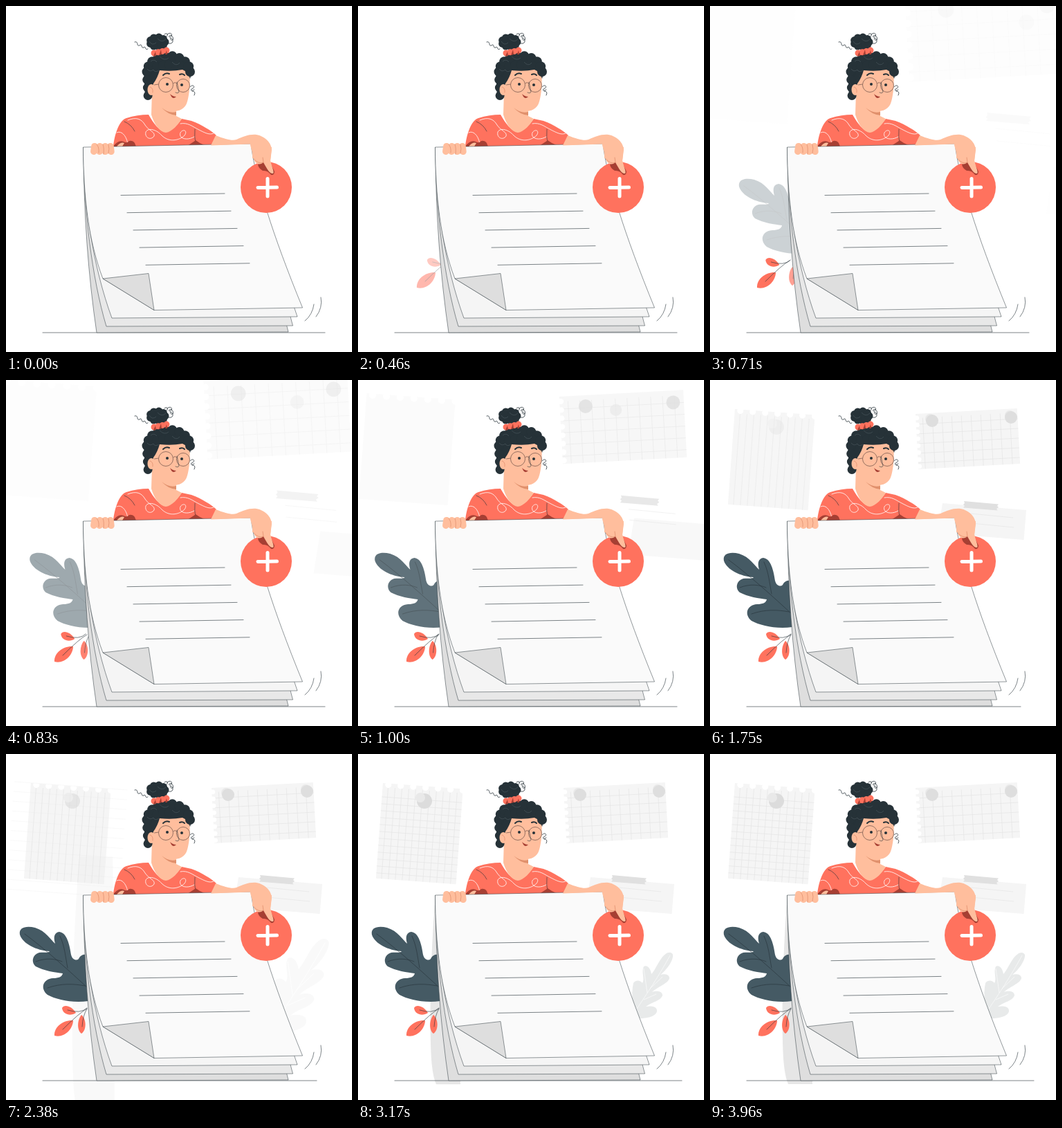
Recreate the animation shown at these times as an HTML page. Size 500 px wide and 500 px high, loop 4 s.

```html
<!DOCTYPE html>
<html lang="en">
<head>
<meta charset="utf-8">
<title>Add a note</title>
<style>
html, body { margin: 0; width: 100%; height: 100%; overflow: hidden; background: #fff; }
svg { display: block; width: 100vw; height: 100vh; }
.ink { fill: none; stroke: #263238; stroke-width: .6; stroke-linecap: round; stroke-linejoin: round; }
.edge { stroke: #263238; stroke-width: .5; stroke-linejoin: round; }
.grid { fill: none; stroke: #e2e2e2; stroke-width: .6; }
.paper { fill: #f5f5f5; }
.skin { fill: #ffbe9d; }
.coral { fill: #ff725e; }
.hair { fill: #263238; }
.shade { fill: #a63f33; }
.wave { fill: none; stroke: #fff; stroke-width: .8; stroke-linecap: round; }
.crease { fill: none; stroke: #dd8a69; stroke-width: .7; stroke-linecap: round; }
.rim { fill: none; stroke: #7b5d52; stroke-width: .8; }
.brow { fill: none; stroke: #263238; stroke-width: 2; stroke-linecap: round; }
</style>
</head>
<body>
<svg viewBox="0 0 500 500" xmlns="http://www.w3.org/2000/svg">
  <g id="gridNote">
    <g transform="translate(297 49) rotate(-3.1)">
      <path class="paper" d="M0 0H147V80H0Z"/>
      <path class="grid" id="gridLines"/>
      <g id="sideHoles" fill="#fff"></g>
    </g>
  </g>
  <g id="pinHeads" fill="#e9e9e9"></g>
  <g id="pinBases" fill="#dedede"></g>

  <g id="tallNote">
    <g transform="translate(36 42) rotate(4.2)">
      <path class="paper" d="M0 0H116V138H0Z"/>
      <path class="grid" id="tallCols"/>
      <g id="topHoles" fill="#fff"></g>
    </g>
  </g>
  <g id="tallRows"><path class="grid" id="rowLines" transform="translate(36 42) rotate(4.2)"/></g>
  <g id="tallPin">
    <circle cx="96" cy="68" r="11" fill="#dcdcdc"/><circle cx="90" cy="63" r="7" fill="#e9e9e9"/>
  </g>

  <path id="smallNote" class="paper" d="M336 178L457 188L453.500 231L329 221Z"/>
  <g id="tape">
    <path class="grid" d="M377 193L438 199M378 207L439 213"/>
    <path fill="#e0e0e0" d="M367 175L417 179.500L415 182L417 184L414 186L415.500 188.500L366 184.500L368 182L366 180L368 178Z"/>
  </g>

  <g id="plant">
    <path fill="#e8eaea" d="M400 381C412 384 432 380 432 371C432 364 422 364 416 365C425 358 437 357 440 349C440 342 430 342 425 344C433 336 448 332 450 324C450 317 440 318 437 319C446 312 456 298 455 290C452 284 444 287 438 296C433 303 428 314 424 318C423 310 418 304 413 307C409 315 415 325 411 331C408 327 402 326 398 331C396 340 396 350 397 360Z"/>
    <path fill="none" stroke="#fff" stroke-width=".6" d="M451 291C438 315 422 340 403 368M413 310L418 345M440 322L422 339M431 347L413 355"/>
  </g>
  <path id="shadow" fill="#e6e6e6" d="M112 205C107 260 102 370 106 440Q108 466 113 477L148 477L146 205Z"/>

  <g id="leaf">
    <path fill="#455a64" d="M119 357C95 360 73 355 60 348C49 339 53 325 68 324C76 324 81 322 82 317C72 316 54 313 43 307C36 301 38 290 48 287C55 286 61 288 63 285C44 284 24 274 20 261C18 250 30 248 42 251C58 256 64 268 71 274C68 264 70 258 77 257C88 258 92 276 94 290C96 298 102 299 105 296C108 290 112 289 119 290Z"/>
    <path class="ink" d="M27 260C58 283 92 314 118 338M78 263C85 278 86 294 89 309M43 300C58 294 72 296 81 300M60 338C80 331 98 332 114 335"/>
  </g>
  <g id="berryC"><path class="coral" d="M109 377C116 382 117 399 109 404C102 399 103 384 109 377Z"/><path class="ink" d="M117 368Q111 378 110 394"/></g>
  <g id="berryB"><path class="coral" d="M81 367C84 361 95 364 101 374C94 379 82 377 81 367Z"/><path class="ink" d="M117 367Q108 376 89 370"/></g>
  <g id="berryA"><path class="coral" d="M97 385C97 398 83 411 70 407C69 395 82 384 97 385Z"/><path class="ink" d="M117 368Q106 374 82 398"/></g>

  <path id="ground" class="ink"/>

  <g id="woman">
    <path class="coral" d="M155 203C157 184 164 165 174 162Q190 157 206 157C214 171 222 181 231 182Q243 179 254 163L268 166C284 172 296 180 304 187L296 203Z"/>
    <path class="skin" d="M211 124L210 157C214 171 222 182 231 183C240 182 249 171 254 163L246 159V145Z"/>
    <path fill="#e0906c" d="M225 147Q236 156 246 153V158Q234 157 225 147Z"/>
    <path class="skin" d="M214 86L264 86C268 110 264 136 260 143C254 153 243 153 233 150C222 146 212 133 211 121Z"/>
    <path class="wave" d="M176 165C188 160 196 163 201 172C206 180 216 182 214 188C209 195 200 190 202 182C206 175 218 179 225 187C236 198 251 194 258 187C263 180 256 177 252 183C249 192 262 195 272 189M160 183C168 179 175 190 176 200M252 170C263 168 269 174 279 179C287 183 294 187 300 184"/>
    <path class="ink" d="M171 167Q181 171 186 181M273 178Q272 189 274 199"/>
    <path class="shade" d="M155 203Q162 193 170 196Q175 199 178 195Q183 194 186 198L188 203ZM262 202Q270 197 274 194Q279 198 287 201Z"/>
    <path class="skin" d="M160 203Q166 196 171 198L168 203Z"/>
    <g class="hair" id="curls">
      <path d="M199 92Q208 68 238 69Q264 73 270 92L266 105Q263 95 255 92Q240 95 222 93Q219 104 213 112L210 133L201 131Z"/>
      <ellipse cx="219" cy="52" rx="13" ry="9"/>
    </g>
    <ellipse class="skin" cx="210" cy="121" rx="5.500" ry="8"/>
    <path class="crease" d="M208 117Q213 118 212 125"/>
    <g class="coral" id="scrunchie"></g>
    <path class="shade" d="M213 72L216 66L217 72ZM221 71L224 63L225 70ZM230 70L232 64L233 70Z"/>
    <path class="ink" style="stroke-width:.8" d="M186 52C192 50 188 59 193 57C197 53 195 62 199 60C203 57 200 65 205 62M229 41C233 37 235 43 232 44M233 41C239 36 242 43 237 45C233 45 238 39 241 45C244 52 235 49 238 46C243 48 242 56 235 54M266 117C270 112 274 117 270 119C265 121 268 124 272 121M269 123Q275 123 272 129"/>
    <path fill="none" stroke="#536067" stroke-width=".5" d="M204 91Q208 96 213 92Q215 97 221 93M209 80Q214 76 218 81M222 73Q229 80 235 75M240 81Q246 88 251 82M207 51Q211 58 217 53M219 47Q225 54 231 48"/>
    <g class="rim">
      <circle cx="231" cy="114" r="10.500"/><circle cx="256" cy="115" r="9.500"/>
      <path d="M241.500 112Q244 109 247 112M214 114L220.500 113"/>
    </g>
    <path class="ink" d="M247 110Q249 120 250 124Q249 127 245 125"/>
    <path class="brow" d="M227 100Q231 96 236 98M251 99Q255 97 258 100"/>
    <circle class="hair" cx="233" cy="113" r="2"/><circle class="hair" cx="254" cy="114" r="2"/>
    <path class="shade" d="M237 127Q241 131 246 131Q241 136 238 129Z"/>
  </g>

  <g class="edge">
    <path fill="#dedede" d="M112 204C112 300 119 390 131 472L408 471L404 455L200 300Z"/>
    <path fill="#e8e8e8" d="M112 204C112 292 124 393 145 463L414.500 462L410 445L200 300Z"/>
    <path fill="#f5f5f5" d="M112 204C112 288 126 377 153 451L421 449L414 428L200 300Z"/>
    <path fill="#fafafa" d="M111.500 204C112 275 119 339 140 394L214 439.500L428.500 436C385 330 360 250 354 199Z"/>
    <path fill="#dedede" d="M140 394L206 386.500L214 439.500Z"/>
  </g>
  <path class="ink" id="ruled"/>
  <path class="ink" d="M445 431Q443 446 432 455M455 421Q458 436 448 449"/>

  <path class="skin" d="M303 187C318 193 327 195 333 193C343 189 351 185 362 186C374 188 384 198 384 208L382 224L356 220C357 210 353 204 353 199.500L296 201.500Z"/>
  <circle class="coral" cx="376" cy="262" r="37"/>
  <path d="M364 262.500L391.500 262M378 249.500V275" stroke="#fff" stroke-width="5" stroke-linecap="round"/>
  <path class="shade" d="M364 229Q371 223 382 227L388 239Q388 245 383 244Q378 237 371 238Q365 235 364 229Z"/>
  <path class="skin" d="M356 204L384 204L382 223C384 232 388 240 386 242C381 243 377 235 372 226C366 231 360 228 358 221Z"/>
  <path class="crease" d="M358 221Q365 229 372 226L371 219"/>
  <g class="skin" id="fingers"></g>
  <path class="crease" d="M131 200Q135 204 134 212M140 200Q142 205 141 214M148 200Q150 206 148 213"/>
</svg>
<script>
const $ = id => document.getElementById(id);
const LOOP = 4000;

const range = (n, fn) => Array.from({ length: n }, (_, i) => fn(i));
const add = (id, parts) => $(id).insertAdjacentHTML("beforeend", parts.join(""));
const dot = (x, y, r) => `<circle cx="${x}" cy="${y}" r="${r}"/>`;
const cols = (n, x, step, h) => range(n, i => `M${x + i * step} 6V${h}`).join("");
const rows = (n, y, step, w) => range(n, i => `M0 ${y + i * step}H${w}`).join("");
const line = (id, d) => $(id).setAttribute("d", d);

// Bumps spread along an arc, angles in turns
const bumps = (n, cx, cy, rx, ry, r, from, to) => range(n, i => {
  const a = 2 * Math.PI * (from + (to - from) * i / (n - 1));
  return dot(cx + rx * Math.cos(a), cy + ry * Math.sin(a), r);
});

// Papers
line("gridLines", cols(10, 10, 14, 80) + rows(5, 15, 14, 147));
line("tallCols", cols(11, 8, 10, 138));
line("rowLines", rows(12, 20, 10, 116));
line("ruled", range(5, i => `M${166 + 9 * i} ${273.5 + 25.2 * i}l150 -2.500`).join(""));
add("sideHoles", range(8, i => dot(1.5, 6 + i * 10, 3.4)));
add("topHoles", range(7, i => dot(8 + i * 18, 2, 4.6)));
add("pinBases", range(2, i => dot(321 + 114 * i, 59 - 5 * i, 9)));
add("pinHeads", range(2, i => dot(318 + 115 * i, 56 - 5 * i, 7)));

// Curls: crown, fringe, side lock and bun
add("curls", bumps(10, 235, 95, 31, 23, 7, .5, 1));
add("curls", range(6, i => dot(217 + i * 9, 87 - Math.sin(i / 5 * Math.PI) * 2, 6)));
add("curls", range(4, i => dot(203 + i * .7, 95 + i * 11.5, 6.5)));
add("curls", bumps(9, 219, 52, 11, 7, 5.5, 0, 8 / 9));
add("scrunchie", range(4, i => dot(214 + i * 6, 68 - i * 1.3, 4.5)));
add("fingers", range(4, i =>
  `<rect x="${123 + i * 7.8}" y="198" width="9.500" height="17" rx="4.500" transform="rotate(${8 - 5 * i} ${128 + i * 7.8} 204)"/>`));

// Share of a span that has passed, straight or eased
const fade = (t, start, time) => Math.min(1, Math.max(0, (t - start) / time));
const ease = (t, start, time) => (1 - Math.cos(Math.PI * fade(t, start, time))) / 2;

// cubic-bezier(.36, -.01, .5, 1.38)
function spring(x) {
  const bez = (s, a, b) => 3 * (1 - s) ** 2 * s * a + 3 * (1 - s) * s * s * b + s ** 3;
  let lo = 0, hi = 1;
  for (let i = 0; i < 20; i++) {
    const mid = (lo + hi) / 2;
    if (bez(mid, .36, .5) < x) lo = mid; else hi = mid;
  }
  return bez(lo, -.01, 1.38);
}

function slide(id, t, start, time) {
  const p = spring(fade(t, start, time));
  $(id).setAttribute("transform", `translate(${30 * (1 - p)} 0)`);
  $(id).setAttribute("opacity", Math.min(1, Math.max(0, p)));
}

function zoom(id, cx, cy, extra, opacity) {
  const s = 1 + extra;
  $(id).setAttribute("transform", `matrix(${s} 0 0 ${s} ${-cx * extra} ${-cy * extra})`);
  $(id).setAttribute("opacity", opacity);
}

function draw(t) {
  const near = .5 * (1 - ease(t, 126, 1270)), far = 2 * near;
  const shown = fade(t, 640, 500);
  zoom("gridNote", 325, 163, far, shown);
  zoom("pinBases", 250, 250, near, shown);
  zoom("pinHeads", 70, 114, far, shown);
  zoom("tape", 250, 250, near, shown);
  zoom("smallNote", 50, 80, far, shown);
  zoom("tallNote", 250, 250, near, fade(t, 600, 1300));
  zoom("tallPin", 250, 250, near, fade(t, 1300, 1700));
  $("tallCols").setAttribute("opacity", fade(t, 900, 1000));

  const late = .5 * (1 - ease(t, 2070, 1150)), lateShown = fade(t, 2200, 750);
  zoom("tallRows", 89, 115, late, lateShown);
  zoom("plant", 427, 335, late, lateShown);
  zoom("shadow", 126, 341, late, lateShown);

  slide("leaf", t, 440, 1000);
  slide("berryA", t, 250, 550);
  slide("berryB", t, 250, 650);
  slide("berryC", t, 250, 1000);
  line("ground", `M53 472H${461 - 12 * ease(t, 1000, 600) + 19 * ease(t, 2400, 310)}`);
}

const begin = performance.now();
function tick() {
  draw((performance.now() - begin) % LOOP);
  requestAnimationFrame(tick);
}
tick();
</script>
</body>
</html>
```
